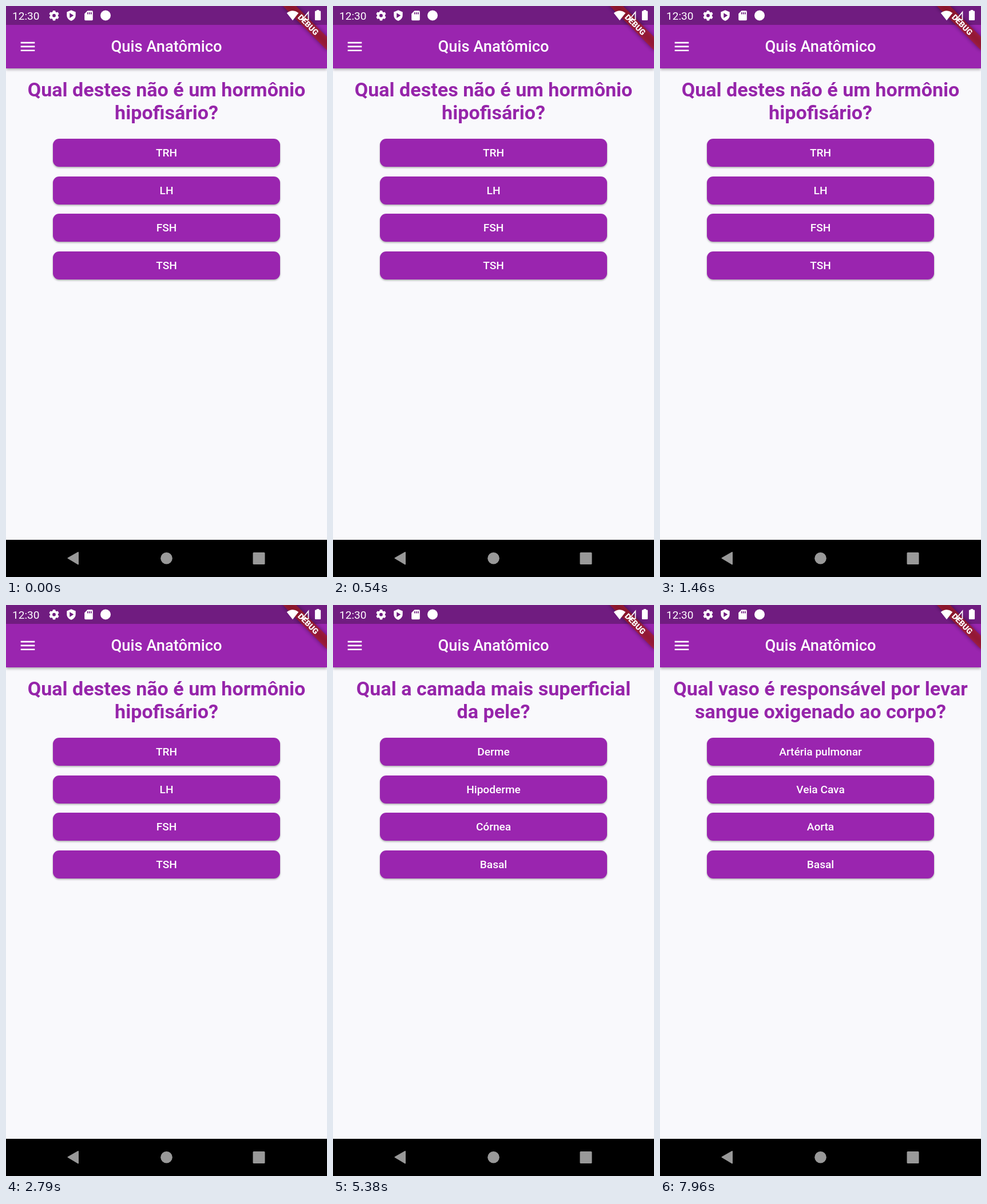
Recreate the animation shown at these times as an HTML page. Size 561 px wide and 998 px high, loop 8 s.

```html
<!DOCTYPE html>
<html lang="pt">
<head>
<meta charset="utf-8">
<style>
  html, body { margin: 0; width: 100%; height: 100%; overflow: hidden; background: #f9f9fc; }
  body { position: relative; font-family: Roboto, sans-serif; }
  #bar { position: absolute; width: 561px; height: 109px; background: #9a25af;
    box-shadow: 0 2px 5px rgba(0,0,0,.34); }
  #status { height: 32.7px; background: #701c80; }
  #title { position: absolute; top: 55px; width: 100%; text-align: center; color: #fff;
    font-size: 27.27px; font-weight: 500; line-height: 32px; }
  #question { position: absolute; top: 127px; width: 561px; text-align: center; color: #9625aa;
    font-size: 34.09px; font-weight: 700; line-height: 39.5px; white-space: pre; }
  .answer { position: absolute; left: 82px; width: 397px; height: 49px; border-radius: 11px;
    background: #9a25af; overflow: hidden; }
  .answer span { position: absolute; inset: 0; text-align: center; color: #fff;
    font-size: 19.09px; font-weight: 500; line-height: 49px; }
  .glow { position: absolute; inset: 0; background: #fff; opacity: 0; }
  .splash { position: absolute; border-radius: 50%; background: #fff; opacity: 0; }
  svg { position: absolute; left: 0; top: 0; }
</style>
</head>
<body>
<div id="bar"><div id="status"></div><div id="title">Quis Anatômico</div></div>
<div id="question"></div>

<svg width="561" height="998" viewBox="0 0 561 998" fill="#fff">
  <filter id="soft" x="-20%" y="-80%" width="140%" height="260%"><feGaussianBlur stdDeviation="3.5"/></filter>
  <path d="M25.7 62.8h24.6v2.7H25.7zM25.7 69.6h24.6v2.7H25.7zM25.7 76.4h24.6v2.7H25.7z"/>

  <g transform="translate(561 0) rotate(45)">
    <rect x="-54.5" y="38.2" width="109" height="16.4" fill="#000" opacity=".45" filter="url(#soft)"/>
    <rect x="-54.5" y="38.2" width="109" height="16.4" fill="#b71c1c" opacity=".63"/>
    <text y="51.2" text-anchor="middle" font-size="13.9" font-weight="900">DEBUG</text>
  </g>

  <text x="11" y="24" font-size="19.1">12:30</text>
  <g id="gear" transform="translate(84 16.7)">
    <circle r="4.9" fill="none" stroke="#fff" stroke-width="4"/>
  </g>
  <path fill-rule="evenodd" d="M114 7.3l7.7 3.2v5.8c0 4.6-3.3 8.3-7.7 9.6-4.400-1.300-7.700-5-7.700-9.600v-5.800zM111.300 12.200v8.800l7-4.400z"/>
  <path fill-rule="evenodd" d="M142.500 8.300h7.700q1.600 0 1.600 1.600v13.700q0 1.600-1.600 1.600h-11.400q-1.600 0-1.600-1.600v-10zM142 11v3.600h1.700V11zM145 11v3.600h1.700V11zM148 11v3.600h1.700V11z"/>
  <circle cx="174" cy="16.500" r="9"/>
  <path d="M501 25.200L490.700 12.200Q501 4.500 511.300 12.200z"/>
  <path d="M528.500 10.700V23.900H517.800z" fill="none" stroke="#fff" stroke-width="1.700"/>
  <path d="M542.800 8.500V7h4.400v1.500h1.600q1.300 0 1.300 1.300v13.900q0 1.300-1.300 1.300h-7.600q-1.300 0-1.300-1.300V9.800q0-1.300 1.300-1.300z"/>

  <rect y="933" width="561" height="65" fill="#000"/>
  <g fill="#999">
    <path d="M108.500 965L126 955v20.500z" stroke="#999" stroke-width="2" stroke-linejoin="round"/>
    <circle cx="280.500" cy="965.300" r="10.300"/>
    <rect x="431.500" y="955" width="21" height="21" rx="1.500"/>
  </g>
</svg>

<script>
const LOOP = 8000, FADE = 200, FIRST_TOP = 232.3, ROW_STEP = 65.4, LEFT = 82, WIDTH = 397, HEIGHT = 49;
const PX_PER_MS = 1.3635;

const screens = [
  { from: 0, question: 'Qual destes não é um hormônio\nhipofisário?', answers: ['TRH', 'LH', 'FSH', 'TSH'] },
  { from: 4060, question: 'Qual a camada mais superficial\nda pele?', answers: ['Derme', 'Hipoderme', 'Córnea', 'Basal'] },
  { from: 6180, question: 'Qual vaso é responsável por levar\nsangue oxigenado ao corpo?',
    answers: ['Artéria pulmonar', 'Veia Cava', 'Aorta', 'Basal'] }
];
const taps = [
  { row: 1, x: 312.5, y: 318, down: 3932, up: 4060 },
  { row: 2, x: 299, y: 398, down: 6175, up: 6180 }
];

const gear = document.getElementById('gear');
for (let i = 0; i < 6; i++) {
  gear.innerHTML += `<path d="M-2 -8.700h4l.9 3.700h-5.800z" transform="rotate(${i * 60})"/>`;
}

const question = document.getElementById('question');
const rows = [0, 1, 2, 3].map(i => {
  const box = document.createElement('div');
  box.className = 'answer';
  box.style.top = FIRST_TOP + i * ROW_STEP + 'px';
  box.innerHTML = '<div class="glow"></div><div class="splash"></div><span></span>';
  document.body.append(box);
  const [glow, splash, label] = box.children;
  return { box, glow, splash, label };
});

const clamp = v => Math.max(0, Math.min(1, v));

// How far the held state has faded in, or back out after release.
function pressLevel(tap, t) {
  const reached = clamp((Math.min(t, tap.up) - tap.down) / FADE);
  return clamp(reached - Math.max(0, t - tap.up) / FADE);
}

// Slow growth while held, fast growth once released.
function splashRadius(tap, t, top) {
  const dx = Math.max(tap.x - LEFT, LEFT + WIDTH - tap.x);
  const dy = Math.max(tap.y - top, top + HEIGHT - tap.y);
  const full = Math.hypot(dx, dy);
  const held = full * (Math.min(t, tap.up) - tap.down) / 1000;
  return Math.min(full, held + Math.max(0, t - tap.up) * full / (full / PX_PER_MS));
}

function draw(t) {
  const screen = screens.filter(s => t >= s.from).pop();
  if (question.textContent !== screen.question) question.textContent = screen.question;

  rows.forEach((row, i) => {
    const top = FIRST_TOP + i * ROW_STEP;
    if (row.label.textContent !== screen.answers[i]) row.label.textContent = screen.answers[i];
    const tap = taps.find(p => p.row === i && t >= p.down && t < p.up + FADE);
    const level = tap ? pressLevel(tap, t) : 0;
    const lift = 1.7 + 6 * level;
    row.box.style.boxShadow = `0 ${lift}px ${lift * 1.8}px rgba(0,0,0,.3)`;
    row.glow.style.opacity = .24 * level;
    row.splash.style.opacity = tap ? .16 * clamp(1 - (t - tap.up) / FADE) : 0;
    if (tap) {
      const r = splashRadius(tap, t, top);
      Object.assign(row.splash.style, {
        left: tap.x - LEFT - r + 'px', top: tap.y - top - r + 'px',
        width: 2 * r + 'px', height: 2 * r + 'px'
      });
    }
  });
}

const start = performance.now();
function tick() {
  draw((performance.now() - start) % LOOP);
  requestAnimationFrame(tick);
}
tick();
</script>
</body>
</html>
```
